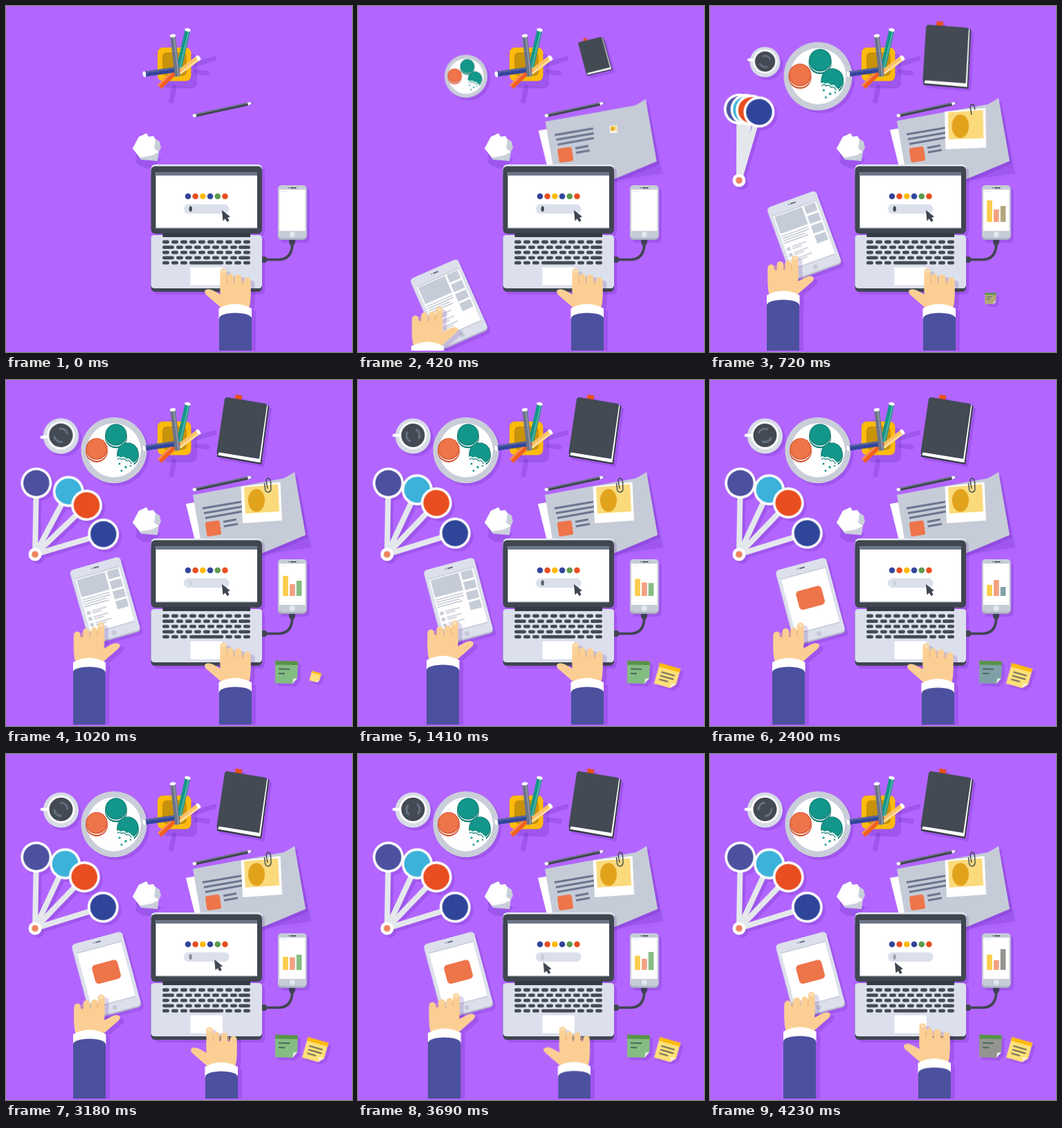
Write an HTML page without scripts that moves like this. It is 500 px wide and 500 px high and loops after 4.26 s.

```html
<!DOCTYPE html>
<html lang="en">
<head>
<meta charset="utf-8">
<title>Desk from above</title>
<style>
html, body { margin: 0; width: 100%; height: 100%; overflow: hidden; background: #b266ff; }
svg { display: block; width: 500px; height: 498px; overflow: hidden; }
.shade { filter: drop-shadow(4px 4px 0 rgba(70, 10, 150, .17)); }
.far { filter: drop-shadow(6.5px 4px 0 rgba(70, 10, 150, .17)); }
.anim, .arm, .bars rect { animation: 4.26s linear infinite; }

#paper { transform-origin: 320px 255px; animation-name: paper; animation-timing-function: ease-out; }
@keyframes paper {
  0%, 4% { transform: scale(0); }
  11% { transform: scale(1.03); }
  15%, 100% { transform: none; }
}
#photo { transform-origin: 370px 177px; animation-name: photo; }
@keyframes photo {
  0%, 9% { transform: scale(0); }
  14% { transform: scale(1.08) rotate(3deg); }
  16.9% { transform: scale(1.03) rotate(1.5deg); }
  22%, 100% { transform: none; }
}
#clip { stroke-dasharray: 64; animation-name: clip; }
@keyframes clip {
  0%, 14% { stroke-dashoffset: 64; }
  16.9% { stroke-dashoffset: 38; }
  22%, 100% { stroke-dashoffset: 0; }
}
#plate { transform-origin: 156px 101.5px; animation-name: plate; }
@keyframes plate {
  0%, 5% { transform: scale(0); }
  13% { transform: scale(1.07); }
  16.9% { transform: scale(1.04); }
  22%, 100% { transform: none; }
}
#book { transform-origin: 342px 72px; animation-name: book; }
@keyframes book {
  0%, 6% { transform: scale(0) rotate(-40deg); }
  13% { transform: scale(1.03) rotate(-10deg); }
  16.9% { transform: rotate(-5deg); }
  24%, 100% { transform: none; }
}
#cup { transform-origin: 79.5px 81px; animation-name: cup; }
@keyframes cup {
  0%, 12.5% { transform: scale(0) rotate(40deg); }
  16.9% { transform: scale(.86) rotate(6deg); }
  20.5% { transform: scale(1.05) rotate(-8deg); }
  23.9% { transform: scale(1.01) rotate(-6deg); }
  30%, 100% { transform: none; }
}
#swirl { transform-origin: 79.5px 80px; animation-name: swirl; }
@keyframes swirl { to { transform: rotate(360deg); } }

#fan { transform-origin: 42px 252px; animation-name: fan; }
@keyframes fan {
  0%, 13.5% { transform: scale(0); }
  16.5%, 100% { transform: none; }
}
.arm { transform-origin: 42px 252px; animation-name: arm; }
@keyframes arm {
  0%, 14.5% { transform: rotate(0deg); }
  16.9% { transform: rotate(calc(var(--a) * .22)); }
  21.5% { transform: rotate(calc(var(--a) * 1.06)); }
  23.9% { transform: rotate(var(--b)); }
  29%, 100% { transform: rotate(var(--a)); }
}

#tablet { transform-origin: 145px 320px; animation-name: tablet; }
@keyframes tablet {
  0%, 5% { transform: translate(-20px, 250px) rotate(-14deg); animation-timing-function: ease-out; }
  16.9% { transform: translate(-9px, 12px) rotate(-5deg); }
  23.9% { transform: translate(-2px, -1px) rotate(-1deg); }
  28%, 100% { transform: none; }
}
#page { animation-name: page; }
@keyframes page {
  0%, 40.5% { opacity: 1; }
  43% { opacity: .65; }
  47%, 100% { opacity: 0; }
}
#tile { animation-name: tile; }
@keyframes tile {
  0%, 41% { transform: scale(0); }
  43% { transform: scale(.37); }
  48% { transform: scale(1.1); }
  51%, 100% { transform: none; }
}
#left { animation-name: left; }
@keyframes left {
  0%, 5% { transform: translate(-30px, 190px); animation-timing-function: ease-out; }
  16.9% { transform: translate(-17px, 13px); }
  23.9% { transform: translate(-2.5px, 3px); }
  28%, 45% { transform: none; animation-timing-function: ease-in-out; }
  56.3% { transform: translate(-9px, 3px); animation-timing-function: ease-in-out; }
  74.7% { transform: translate(-2px, 0); }
  99.3%, 100% { transform: translate(7px, -4px); }
}
#right { animation-name: right; }
@keyframes right {
  0%, 54% { transform: none; }
  56.3% { transform: translate(-2px, 1px); animation-timing-function: ease-out; }
  74.7%, 83% { transform: translate(-20px, 15px); animation-timing-function: ease-in-out; }
  99.3%, 100% { transform: translate(-7px, 9.5px); }
}
#pointer { animation-name: pointer; }
@keyframes pointer {
  0%, 70% { transform: none; animation-timing-function: ease-in; }
  74.7% { transform: translate(-11px, 2px); animation-timing-function: ease-out; }
  88%, 100% { transform: translate(-45px, 6px); }
}
#caret { animation-name: caret; }
@keyframes caret {
  0%, 16.9% { opacity: 1; }
  23.9% { opacity: .08; }
  34% { opacity: .9; }
  43% { opacity: .5; }
  56.3% { opacity: .1; }
  66% { opacity: .9; }
  74.7% { opacity: .55; }
  85% { opacity: .1; }
  99.3%, 100% { opacity: .4; }
}

.bars rect { width: 7.6px; }
.bars :nth-child(1) { animation-name: bar1; }
.bars :nth-child(2) { animation-name: bar2; }
.bars :nth-child(3) { animation-name: bar3, leaf; }
@keyframes bar1 {
  0%, 10% { height: 0; } 16.9% { height: 31px; } 23.9% { height: 29px; } 43% { height: 20px; }
  56.3% { height: 16px; } 74.7% { height: 19px; } 99.3%, 100% { height: 22px; }
}
@keyframes bar2 {
  0%, 11% { height: 0; } 16.9% { height: 18px; } 23.9% { height: 17px; } 43% { height: 22px; }
  56.3% { height: 23px; } 74.7% { height: 18px; } 99.3%, 100% { height: 14px; }
}
@keyframes bar3 {
  0%, 12% { height: 0; } 16.9% { height: 23px; } 23.9% { height: 22px; } 43% { height: 15px; }
  56.3% { height: 13px; } 74.7% { height: 22px; } 99.3%, 100% { height: 30px; }
}
.leaf { animation-name: leaf; }
@keyframes leaf {
  0%, 18% { fill: #b3a87c; }
  22%, 50% { fill: #84bd82; }
  55%, 58% { fill: #80a0a8; }
  64%, 90% { fill: #84bd82; }
  96%, 100% { fill: #949590; }
}
#note1 { transform-origin: 405.5px 423px; animation-name: note1; }
@keyframes note1 {
  0%, 14.5% { transform: scale(0); }
  16.9% { transform: scale(.5); }
  21% { transform: scale(1.07); }
  23.9%, 100% { transform: none; }
}
#note2 { transform-origin: 447px 430px; animation-name: note2; }
@keyframes note2 {
  0%, 21.5% { transform: scale(0); }
  23.9% { transform: scale(.45); }
  28% { transform: scale(1.07); }
  31%, 100% { transform: none; }
}
#lines { animation-name: lines; }
@keyframes lines {
  0%, 24% { opacity: 0; }
  31%, 100% { opacity: 1; }
}
</style>
</head>
<body>
<svg viewBox="0 0 500 498">
  <defs>
    <g id="hand">
      <g fill="#fbcf94">
        <path d="M312 437 289 417Q285 412 289 410Q293 408 299 411L312 418Z"/>
        <rect x="309.5" y="379.5" width="9.6" height="36" rx="4.8"/>
        <rect x="319.6" y="386.5" width="9" height="30" rx="4.5"/>
        <rect x="331" y="388" width="9.3" height="30" rx="4.6"/>
        <rect x="343.8" y="392.5" width="9.7" height="30" rx="4.8"/>
        <path d="M309.5 400H353.5V420Q353.5 430 351 437H310Z"/>
      </g>
      <path d="M319.4 391V400M330 392V401M341.8 394V403" fill="none" stroke="#e9b777" stroke-width="1.3"/>
      <ellipse cx="314.3" cy="383.6" rx="2.6" ry="2.4" fill="#fde3bd"/>
      <path d="M307.5 437Q331 424 355 437V452H307.5Z" fill="#fff"/>
      <path d="M308 451Q310 444 331 443.5Q353 444 355 451V580H308Z" fill="#4b519e"/>
    </g>
    <g id="macaron">
      <circle r="16" cy=".5" fill="var(--d)"/>
      <circle r="15.4" cy="-1.2" fill="#fff"/>
      <circle r="15.6" cy="-2.8" fill="var(--d)"/>
      <circle r="14.4" cy="-3" fill="var(--c)"/>
    </g>
    <g id="stick">
      <path d="M42 252V165" stroke="#e4e7ec" stroke-width="8"/>
      <circle cx="42" cy="149" r="22.5" fill="#fff"/>
      <circle cx="42" cy="149" r="18.8" fill="var(--c)"/>
    </g>
  </defs>

  <!-- newspaper -->
  <g class="shade"><g id="paper" class="anim">
    <path d="M421 150 441 242 370 252 300 262 290 200Z" fill="#46149a" opacity=".14"/>
    <path d="M260 179 300 172 360 235 300 255 275 240Z" fill="#fff"/>
    <path d="M270 166 402 142 417 133 433 224 395 240 371 250 286 258Z" fill="#c6ccd7"/>
    <path d="M284 185.5 340 176M286 192.5 341 183M288 199.5 341 190M314 205 333 201.5M315 211.5 335 208" stroke="#6b768f" stroke-width="3.2"/>
    <rect x="289" y="204" width="21" height="21" rx="3" fill="#ee744a" transform="rotate(-8 299.5 214.5)"/>
    <g id="photo" class="anim">
      <path d="M339.5 154 396.5 147.5 399 203 342 207Z" fill="#fff"/>
      <path d="M344 155 393 150.500 395 190 346 193Z" fill="#fbda7c"/>
      <ellipse cx="362" cy="174" rx="12" ry="16.5" fill="#e2a31c"/>
    </g>
    <path id="clip" class="anim" d="M378 157 376 146Q376 142 379.5 142Q382 143 382.5 147L383 158Q382 162 378.5 162Q375 162 374.5 158L373.5 149" fill="none" stroke="#434a54" stroke-width="1.4"/>
  </g></g>

  <!-- book -->
  <g class="shade"><g id="book" class="anim">
    <path d="M332 21 341.5 22.5 340 31 330 29Z" fill="#e84e1f"/>
    <path d="M318 27 380.5 37 369 122 305 111 305 105Z" fill="#353b43"/>
    <path d="M308 104 366 110 376 36 378.5 37 367.5 119.5 306 108.5Z" fill="#fff"/>
    <path d="M320 25 374.5 34Q377.5 34.5 377 37.5L366 114 304.5 104 316 27.5Q317 24.5 320 25Z" fill="#434a54"/>
  </g></g>

  <!-- plate -->
  <g class="shade"><g id="plate" class="anim">
    <circle cx="156" cy="101.5" r="47.5" fill="#c9ced9"/>
    <circle cx="156" cy="101.5" r="39" fill="#fff"/>
    <use href="#macaron" x="159" y="82" style="--c:#12978a;--d:#0c7a70"/>
    <use href="#macaron" x="131" y="102.5" style="--c:#ee744a;--d:#d2502a"/>
    <use href="#macaron" x="176" y="109" style="--c:#12978a;--d:#0c7a70"/>
    <path d="M158 113Q162 108 166 112Q171 109 174 114Q179 112 181 117Q186 118 185 128L158 128Z" fill="#fff"/>
    <path d="M161 115Q164 111 167 115Q171 112 174 117Q179 115 181 121" fill="none" stroke="#0c7a70" stroke-width="1.2"/>
    <g fill="#12978a"><circle cx="164" cy="121" r="1.5"/><circle cx="173" cy="126" r="1.7"/><circle cx="167" cy="131" r="1.5"/><circle cx="180" cy="124" r="1.2"/></g>
  </g></g>

  <!-- coffee -->
  <g class="shade"><g id="cup" class="anim">
    <circle cx="79.5" cy="81" r="25.5" fill="#d7dce6"/>
    <path d="M52 80H64" stroke="#fff" stroke-width="4.5" stroke-linecap="round"/>
    <circle cx="79.5" cy="80" r="20" fill="#fff"/>
    <circle cx="79.5" cy="80" r="17" fill="#434a54"/>
    <g id="swirl" class="anim" fill="none" stroke="#687180" stroke-width="2.8">
      <path d="M70 81A9.500 9.500 0 0 1 80 70.500M89 79A9.500 9.500 0 0 1 79 89.500"/>
    </g>
  </g></g>

  <!-- pencil pot -->
  <path d="M275 84 301 76M275 95 291 97M243 117 239 137" stroke="#46149a" stroke-opacity=".18" stroke-width="7" stroke-linecap="round"/>
  <rect x="227" y="69" width="49" height="50" rx="8" fill="#46149a" opacity=".18"/>
  <rect x="219" y="60" width="48.5" height="48.5" rx="8" fill="#fdba0c"/>
  <rect x="226" y="67" width="35" height="34" rx="6" fill="#c8920a"/>
  <g stroke-width="7.6">
    <path d="M262.5 35 250 90" stroke="#12978a"/><path d="M264 36 251.5 90" stroke="#5cb5a6" stroke-width="1.8"/>
    <path d="M278 75 250 96" stroke="#fbc165"/><path d="M279 77 251 98" stroke="#fde0a2" stroke-width="2.5"/>
    <path d="M222 117 250 90" stroke="#f0601f"/><path d="M220 115 248 88" stroke="#f68d55" stroke-width="2.5"/>
    <path d="M200 98.5 245 92" stroke="#33459a"/><path d="M200 96 245 89.5" stroke="#55659f" stroke-width="2.5"/>
    <path d="M241 43 248 102" stroke="#6c7489"/><path d="M242.500 43 249.500 102" stroke="#9097a6" stroke-width="2"/>
  </g>
  <g fill="#fff">
    <ellipse cx="262.5" cy="34.5" rx="4.3" ry="2.3" transform="rotate(13 262.5 34.5)"/>
    <ellipse cx="278" cy="75" rx="2.4" ry="4.3" transform="rotate(-38 278 75)"/>
    <ellipse cx="200" cy="98.5" rx="2.3" ry="4.3" transform="rotate(-8 200 98.5)"/>
    <ellipse cx="241" cy="43" rx="4.3" ry="2.3" transform="rotate(-7 241 43)"/>
  </g>

  <!-- pencil -->
  <path d="M272 158.5 350 141.500" stroke="#3f4650" stroke-width="4.6"/>
  <path d="M272 157 350 140" stroke="#747c90" stroke-width="1.6"/>
  <ellipse cx="272.5" cy="158.3" rx="2.8" ry="2.4" fill="#fff"/>
  <path d="M349 139 357 139.7 350 143.8Z" fill="#fff"/>
  <path d="M354.5 139.4 358 139.5 355 141.2Z" fill="#3f4650"/>

  <!-- crumpled paper -->
  <path d="M188 214 225 221 212 235Q196 235 188 227Z" fill="#46149a" opacity=".18"/>
  <path d="M203 184 206 189 213 188 215 191 222 196 224 205 221 210 219 224 195 222 183 206 192 189Z" fill="#c9cfda"/>
  <path d="M203 184 206 189 213 188 216 194 214 206 221 211 211 216 194 219 183 206 192 189Z" fill="#fff"/>

  <!-- fan of badges -->
  <g class="shade"><g id="fan" class="anim">
    <use href="#stick" class="arm" style="--a:1deg;--b:1deg;--c:#4b519e"/>
    <use href="#stick" class="arm" style="--a:25deg;--b:28deg;--c:#3cb2da"/>
    <use href="#stick" class="arm" style="--a:43.8deg;--b:46.4deg;--c:#e84e1f"/>
    <use href="#stick" class="arm" style="--a:72.7deg;--b:73.5deg;--c:#2f459a"/>
    <circle cx="42" cy="252" r="9.5" fill="#fff"/>
    <circle cx="42" cy="252" r="4.8" fill="#ee8560"/>
  </g></g>

  <!-- laptop -->
  <g class="shade">
    <rect x="209.5" y="331" width="160.5" height="82" rx="6" fill="#3f4650"/>
    <path d="M215 331H365Q370 331 370 336V403Q370 408 365 408H215Q209.5 408 209.5 403V336Q209.5 331 215 331Z" fill="#dce0ec"/>
    <rect x="209.5" y="229" width="160.5" height="20" rx="6" fill="#e6eaf2"/>
    <rect x="209.5" y="231.5" width="160.5" height="97.5" rx="6" fill="#3f4650"/>
  </g>
  <rect x="226.5" y="328" width="126.5" height="6" fill="#343a43"/>
  <rect x="216.5" y="240" width="146.5" height="81" fill="#fff"/>
  <path d="M216.5 242.5H363" stroke="#6c7588" stroke-width="5"/>
  <path d="M216.5 320.5H363" stroke="#c9ced9" stroke-width="1.5"/>
  <g stroke="#434a54" stroke-width="4.8" stroke-linecap="round" fill="none">
    <path d="M228.4 341H350.7M228.4 356.2H350.7" stroke-dasharray="5.2 7.8"/>
    <path d="M248.4 348.7H331.7M248.4 363.8H331.7" stroke-dasharray="5.2 7.8"/>
    <path d="M228.4 348.7h12.2M338.4 348.7h12.2M228.4 363.8h12.2M338.4 363.8h12.2M267.4 371.2h44.5"/>
    <path d="M228.4 371.2H259.7M319.4 371.2H350.7" stroke-dasharray="5.2 7.8"/>
  </g>
  <rect x="266.5" y="377.5" width="46.5" height="26" rx="1.5" fill="#fff"/>
  <g>
    <circle cx="263" cy="275" r="4.3" fill="#33459a"/><circle cx="273.7" cy="275" r="4.3" fill="#e84e1f"/>
    <circle cx="284.4" cy="275" r="4.3" fill="#fdba0c"/><circle cx="295.1" cy="275" r="4.3" fill="#33459a"/>
    <circle cx="305.8" cy="275" r="4.3" fill="#5c9a4c"/><circle cx="316.5" cy="275" r="4.3" fill="#e84e1f"/>
  </g>
  <rect x="257" y="286.5" width="65.5" height="13.7" rx="6.8" fill="#dce0ec"/>
  <ellipse id="caret" class="anim" cx="266.7" cy="293.3" rx="2.2" ry="4" fill="#434a54"/>
  <path id="pointer" class="anim" d="M312 295 313.5 310.5 316.8 307.5 319.5 312 322.7 310.3 320.3 305.8 324 304.5Z" fill="#3f4650"/>

  <!-- phone -->
  <path d="M413.5 343V347Q412 366 394 366.5H373" fill="none" stroke="#3f4650" stroke-width="3.6"/>
  <path d="M409 338H418V342L416 346H411L409 342ZM370 362H375L377 364V369L375 371H370Z" fill="#3f4650"/>
  <g class="shade">
    <rect x="393" y="261" width="41.5" height="77" rx="5" fill="#a9afbd"/>
    <rect x="393" y="259" width="41.5" height="76.5" rx="5" fill="#c6ccd7"/>
  </g>
  <rect x="395" y="265.5" width="37.5" height="59.5" fill="#fff"/>
  <path d="M411 262.8H419.5" stroke="#434a54" stroke-width="1.6"/><circle cx="408.5" cy="262.8" r=".8" fill="#434a54"/>
  <path d="M397.5 268H406" stroke="#c6ccd7" stroke-width="1.2" stroke-dasharray="1.5 1"/>
  <circle cx="413.7" cy="330" r="3.9" fill="#e3e7ef"/>
  <g class="bars" transform="matrix(1 0 0 -1 0 312)">
    <rect x="400.2" fill="#fdcb4b"/><rect x="410" fill="#f4a07f"/><rect x="419.7" fill="#84bd82"/>
  </g>

  <!-- sticky notes -->
  <g class="shade"><g id="note1" class="anim">
    <path class="anim leaf" d="M389 406 422 407 421 431 414 439 389 438Z"/>
    <path d="M389.3 405.5 422 406.5 421.5 412 389.3 411.5Z" fill="#589448"/>
    <path d="M414 439 415 431.5 421 431Z" fill="#e3efdf"/>
    <path d="M394 417.5 410 418M394 424 403 424.3" stroke="#4c6a5c" stroke-width="2.2"/>
  </g></g>
  <g class="shade"><g id="note2" class="anim"><g transform="rotate(16 447 428)">
    <path d="M431.5 413H462.5V436L455.5 443.5H431.5Z" fill="#fee07a"/>
    <path d="M431.5 412.5H462.5V418H431.5Z" fill="#fdba0c"/>
    <path d="M455.5 443.5V436H462.5Z" fill="#fff3cc"/>
    <path id="lines" class="anim" d="M437 424.5H457M437 430H457M437 435.5H450" stroke="#6b6858" stroke-width="2.2"/>
  </g></g></g>

  <!-- tablet -->
  <g class="shade"><g id="tablet" class="anim"><g transform="translate(145 320) rotate(-15)">
    <rect x="-37.5" y="-54" width="75.5" height="110.5" rx="5.5" fill="#b4bac8"/>
    <rect x="-37.5" y="-56" width="75.5" height="110.5" rx="5.5" fill="#dce0ec"/>
    <rect x="-32.5" y="-42" width="65.5" height="82" fill="#fff"/>
    <path d="M-32.5-42H33M-32.5 40H33" stroke="#c3c9d5" stroke-width="1.3"/>
    <path d="M-3-50H5" stroke="#434a54" stroke-width="1.5"/><circle cx="-5.5" cy="-50" r=".8" fill="#434a54"/>
    <circle cy="48" r="3.4" fill="#c3c9d5"/>
    <g id="page" class="anim" fill="#c6ccd7">
      <path d="M-31-40H11V-14H-31ZM14-40H31V-28H14ZM14-25H31V-13H14ZM14-10H31V2H14ZM14 5H31V17H14Z"/>
      <path d="M-31-10H10M-31-6.500H10M-31-3H3M-31 .5H6M-22 9H0M-22 12H-8M-22 18H0M-22 21H-8M-22 27H2M-22 30H-6" stroke="#a3aaba" stroke-width="1.2"/>
      <path d="M-30 8h5v5h-5zM-30 17h5v5h-5zM-30 26h5v5h-5z"/>
    </g>
    <g transform="translate(1.5 -5)"><rect id="tile" class="anim" x="-19" y="-14" width="38" height="28" rx="5" fill="#ee744a"/></g>
  </g></g></g>

  <!-- hands -->
  <g class="far"><g id="left" class="anim"><use href="#hand" transform="matrix(-1 0 0 1 454 -32)"/></g></g>
  <g class="far"><g id="right" class="anim"><use href="#hand"/></g></g>
</svg>
</body>
</html>
```
